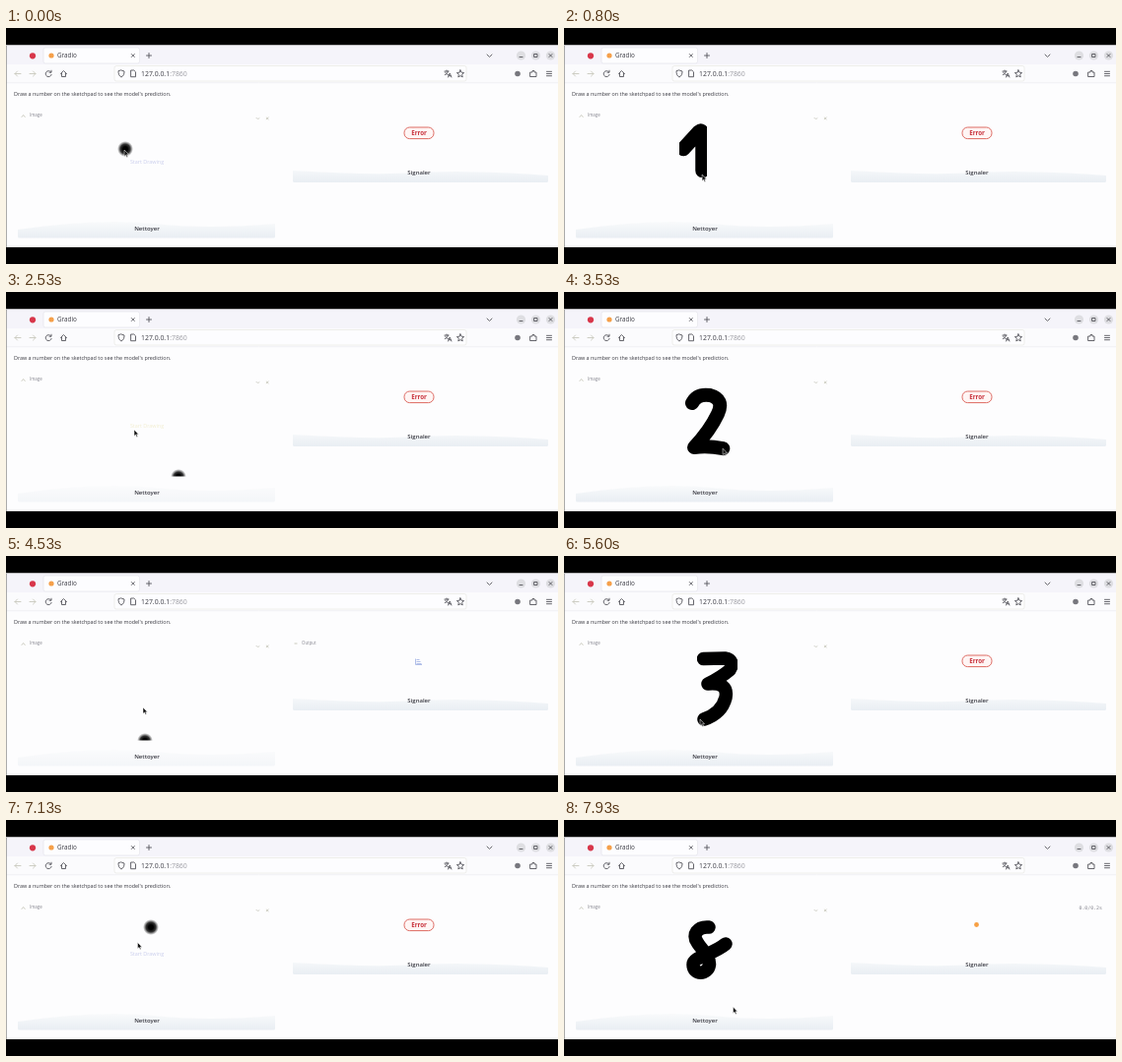
These frames come from a looping animation (560x240 px, 8000 ms). An HTML page:

```html
<!DOCTYPE html>
<html lang="fr">
<head>
<meta charset="utf-8">
<title>Sketchpad</title>
<style>
html, body { margin: 0; width: 100%; height: 100%; overflow: hidden; background: #000; }
svg { display: block; width: 100vw; height: 100vh; }
text { font-family: "Open Sans", "Noto Sans", sans-serif; fill: #3a3a42; }
.line { fill: none; stroke: #55555c; stroke-width: .9; stroke-linecap: round; stroke-linejoin: round; }
.pale { stroke: #c9c9bd; }
.mid { text-anchor: middle; }
.btn { font-size: 6px; font-weight: 600; }
.small { font-size: 4.4px; fill: #85858f; }
#strokes path { fill: none; stroke: #000; stroke-linecap: round; stroke-linejoin: round; }
</style>
</head>
<body>
<svg viewBox="0 0 560 240">
  <defs>
    <linearGradient id="face" x2="0" y2="1">
      <stop offset="0" stop-color="#fafbfc"/>
      <stop offset=".45" stop-color="#f2f5f8"/>
      <stop offset="1" stop-color="#e9eef3"/>
    </linearGradient>
    <radialGradient id="soft">
      <stop offset=".3" stop-color="#000"/>
      <stop offset=".62" stop-color="#111" stop-opacity=".85"/>
      <stop offset="1" stop-color="#444" stop-opacity="0"/>
    </radialGradient>
    <filter id="blur" x="-20%" y="-20%" width="140%" height="140%">
      <feGaussianBlur stdDeviation=".75"/>
    </filter>
    <clipPath id="pad"><rect x="13" y="86" width="260" height="101.5"/></clipPath>
  </defs>

  <rect width="560" height="240"/>
  <rect y="17.5" width="560" height="205.5" fill="#fdfdfe"/>

  <!-- Tab strip -->
  <rect y="17.5" width="560" height="19.5" fill="#f5f4fa"/>
  <rect x="38" y="20" width="97.500" height="16" rx="2" fill="#fdfdff" stroke="#e3e2ea" stroke-width=".6"/>
  <circle cx="27" cy="28.300" r="3.100" fill="#d8364a"/>
  <circle cx="46" cy="28" r="2.600" fill="#f5a04a"/>
  <text x="52" y="30.200" font-size="6.300">Gradio</text>
  <path class="line" d="M127.300 26.500l3 3m0-3l-3 3M142.500 28h5M145 25.500v5M488 27l2.500 2.400 2.500-2.400"/>
  <g fill="#dedee2">
    <circle cx="522.500" cy="28" r="4.600"/><circle cx="537.500" cy="28" r="4.600"/><circle cx="552.500" cy="28" r="4.600"/>
  </g>
  <path class="line" d="M521 29.500h3M536 26.500h3v3h-3zM551 26.500l3 3m0-3l-3 3"/>

  <!-- Toolbar -->
  <rect y="37" width="560" height="18.500" fill="#fbfbfd"/>
  <path d="M0 55.700H560" stroke="#e9e8ee" stroke-width=".6"/>
  <rect x="110" y="38.500" width="357" height="15.500" rx="2" fill="#fdfdff" stroke="#e8e8e2" stroke-width=".7"/>
  <path class="line pale" d="M15 46.500h-6m2.500-2.500l-2.500 2.500 2.500 2.500M24 46.500h6m-2.500-2.500l2.500 2.500-2.500 2.500"/>
  <path class="line" d="M45.600 44.800a3 3 0 1 0 .5 2.600M46 43.200v2h-2M55.500 46.500l3-3 3 3M56.500 46v3.500h4V46"/>
  <path class="line" d="M117 43l3 1c0 3-.8 4.800-3 6-2.200-1.200-3-3-3-6zM127 43h2.800l1.700 1.700v5H127z"/>
  <text x="137" y="48.800" font-size="6.900" fill="#222">127.0.0.1<tspan fill="#9a9aa0">:7860</tspan></text>
  <path class="line" d="M445 44h4M447 43v1m1.500 0c-.5 2-1.700 3-3.200 3.600M445.500 45c.8 1.300 1.700 2 3 2.600M448.500 50l1.700-4 1.700 4m-2.700-1.300h2"/>
  <path class="line" d="M461 42.800l1.100 2.400 2.500.3-1.900 1.800.5 2.600-2.200-1.300-2.200 1.300.5-2.600-1.900-1.800 2.500-.3z"/>
  <circle cx="519" cy="46.500" r="2.800" fill="#77777e"/>
  <path class="line" d="M532 45h2v-1.500h2V45h2v4.500h-6zM548.500 44.300h5m-5 2.200h5m-5 2.200h5"/>
  <path d="M.4 18V223" stroke="#8a8a88" stroke-width=".8"/>

  <!-- Page -->
  <text x="8" y="69.300" font-size="5.400">Draw a number on the sketchpad to see the model's prediction.</text>
  <path class="line pale" stroke-width=".6" d="M16 90.500l1.500-2 1.700 2M254 91.500c.8 1.200 2 1.200 3 .2M264.200 91l2 1.800m0-1.800l-2 1.800"/>
  <text class="small" x="24" y="90.300">Image</text>
  <text id="hint" class="mid" x="143" y="137.500" font-size="5.400">Start Drawing</text>

  <g id="clear">
    <rect x="12" y="196" width="261" height="17.500" rx="1.500" fill="url(#face)"/>
    <path d="M12 196H273V199Q205 205 150 199T12 205z" fill="#fdfdfe"/>
  </g>
  <text class="btn mid" x="143" y="206">Nettoyer</text>
  <rect x="291" y="140" width="259" height="17" rx="1.500" fill="url(#face)"/>
  <path d="M291 140H550V150Q470 144 420 147T291 145z" fill="#fdfdfe"/>
  <text class="btn mid" x="419" y="149.300">Signaler</text>

  <g id="error">
    <rect x="404" y="101" width="30" height="11.600" rx="5.500" fill="#fff5f4" stroke="#dd6a62" stroke-width="1"/>
    <text class="mid" x="419" y="109.200" font-size="6.200" font-weight="700" style="fill:#c8323c">Error</text>
  </g>
  <g id="busy">
    <circle cx="418.500" cy="106.500" r="2.400" fill="#f7a044"/>
    <text id="timer" x="546" y="90.700" text-anchor="end" font-size="4.900" style="font-family:'DejaVu Sans Mono',monospace;fill:#85858f"></text>
  </g>
  <g id="empty">
    <text class="small" x="300" y="90.300">Output</text>
    <path d="M292.500 89h3" stroke="#c9c9bd"/>
    <path d="M415.500 104.500V110.500H422M416.500 105.500h3m-3 2h4m-4 2h5" fill="none" stroke="#a9b8e6" stroke-width=".9"/>
  </g>

  <g clip-path="url(#pad)">
    <g id="strokes" filter="url(#blur)"></g>
    <circle id="brush" r="8" fill="url(#soft)"/>
  </g>
  <path id="cursor" d="M0 0V6.400L1.500 5.100 2.600 7.400 3.600 6.900 2.600 4.700H4.500z" fill="#111" stroke="#fff" stroke-width=".5"/>
</svg>
<script>
const LOOP = 8000, STEP = 1000 / 15;
const $ = id => document.getElementById(id);
const show = (el, on) => { el.style.display = on ? "" : "none"; };
const within = (t, spans) => spans.some(([a, b]) => t >= a && t < b);

// Each digit: pen down, pen up, cleared, width, outline
const digits = [
  [40, 740, 1900, 14.5, "M121 123L137 105.500Q140 103 140.500 108L140.500 145"],
  [2760, 3560, 4240, 14, "M130 113Q135 103 148 105Q163 109 156 124Q148 141 132 158Q148 156 165 160"],
  [4760, 5600, 6520, 13.5, "M141.500 104.500L163 104Q174 106 168 116Q160 123 146 130Q167 128 164 144Q160 160 142 166"],
  [7160, 7760, 8001, 13.5, "M147 109C135 108 130 117 135 124C138 130 148 138 147.500 147C146 158 131 158 131 147C131 139 151 137 164 126"]
].map(([from, to, gone, width, d]) => {
  const path = document.createElementNS("http://www.w3.org/2000/svg", "path");
  path.setAttribute("d", d);
  path.setAttribute("stroke-width", width);
  $("strokes").append(path);
  return { from, to, gone, path, len: path.getTotalLength() };
});

// Pointer between the strokes: time, x, y
const moves = [
  [0, 120, 124], [40, 121, 123], [740, 140, 149], [1050, 141, 150], [1650, 168, 198], [2000, 172, 200],
  [2330, 158, 172], [2530, 130, 140], [2760, 130, 113], [3560, 165, 160], [3800, 164, 164],
  [4120, 146, 200], [4330, 144, 199], [4530, 139, 154], [4760, 141, 105], [5600, 138, 166],
  [5850, 139, 168], [6350, 150, 200], [6620, 150, 200], [6930, 143, 155], [7130, 133, 125],
  [7160, 147, 109], [7760, 164, 126], [7930, 171.500, 190], [8000, 171, 196]
];
// Lagging brush tip, shown only while the pad is empty
const tips = [
  [0, 121, 123], [1900, 175, 188], [2533, 175, 188], [2760, 130, 113],
  [4240, 141, 188], [4534, 141, 188], [4760, 141, 105],
  [6520, 150, 188], [6850, 150, 188], [7080, 147, 109], [7160, 147, 109]
];
const busySpans = [[870, 1100], [1930, 2060], [3660, 3900], [4270, 4390], [5700, 5930], [6550, 6680], [7850, 8000]];
const emptySpans = [[2060, 2260], [4390, 4740], [6680, 6880]];

function at(keys, t) {
  const i = keys.findIndex(k => k[0] > t);
  if (i < 0) return keys[keys.length - 1].slice(1);
  const [a, ax, ay] = keys[i - 1], [b, bx, by] = keys[i];
  const p = (t - a) / (b - a), e = p * p * (3 - 2 * p);
  return [ax + (bx - ax) * e, ay + (by - ay) * e];
}

function render(t) {
  let [x, y] = at(moves, t);
  let blank = true;
  for (const { from, to, gone, path, len } of digits) {
    const on = t > from && t < gone;
    show(path, on);
    if (!on) continue;
    blank = false;
    const done = Math.min(1, (t - from) / (to - from)) * len;
    path.setAttribute("stroke-dasharray", `${done} ${len * 2}`);
    if (t < to) {
      const p = path.getPointAtLength(done);
      [x, y] = [p.x, p.y];
    }
  }
  $("cursor").setAttribute("transform", `translate(${x} ${y})`);

  const [bx, by] = at(tips, t);
  $("brush").setAttribute("cx", bx);
  $("brush").setAttribute("cy", by);
  show($("brush"), blank);

  show($("hint"), blank && !within(t, [[4240, 4760]]));
  $("hint").style.fill = t > 1900 && t < 2760 ? "#f1edcf" : "#c9cdec";
  $("clear").style.opacity = within(t, [[1600, 2700], [4000, 4740]]) ? .45 : 1;

  const run = busySpans.find(([a, b]) => t >= a && t < b);
  const empty = within(t, emptySpans);
  show($("busy"), run);
  show($("empty"), empty);
  show($("error"), !run && !empty);
  if (run) $("timer").textContent = `${(Math.floor((t - run[0]) / 100) / 10).toFixed(1)}/0.2s`;
}

const start = performance.now();
function tick() {
  const t = (performance.now() - start) % LOOP;
  render(Math.floor((t + 5) / STEP) % 120 * STEP);
  requestAnimationFrame(tick);
}
tick();
</script>
</body>
</html>
```
